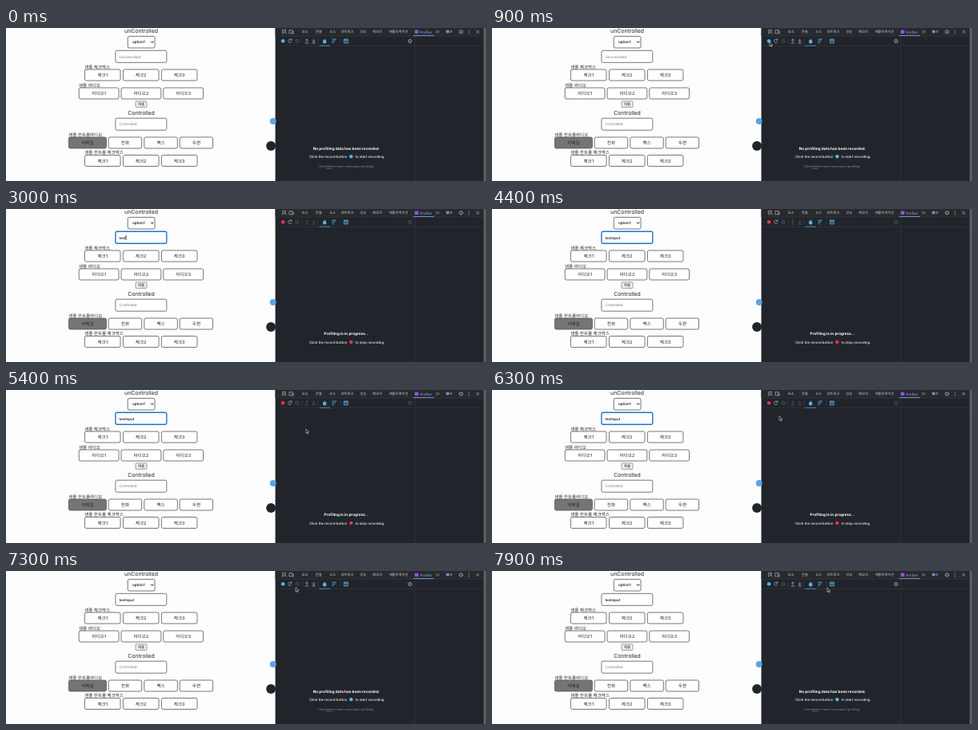
These frames come from a looping animation (600 px wide and 192 px high, 8000 ms). An HTML page:

```html
<!DOCTYPE html>
<html lang="ko">
<head>
<meta charset="utf-8">
<title>Profiler demo</title>
<style>
  html, body { margin: 0; width: 100%; height: 100%; overflow: hidden; background: #fdfdfd; }
  svg { display: block; width: 100vw; height: 100vh; }
  text {
    font-family: Inter, "Noto Sans CJK KR", "Noto Sans CJK", sans-serif;
    text-rendering: geometricPrecision;
    white-space: pre;
  }
  .icon { fill: none; stroke: #a9aeb6; stroke-width: .75; }
  .blue { fill: none; stroke: #5fb0ea; stroke-width: .9; }
</style>
</head>
<body>
<svg id="stage" viewBox="0 0 600 192" xmlns="http://www.w3.org/2000/svg"></svg>
<script>
const LOOP = 8000, START = 1000, FOCUS = 2000, STOP = 7200;
const WORD = "textinput";
const KEYS = [2300, 2500, 2600, 2800, 3200, 3300, 3500, 3600, 3700];
// Pointer routes as [time, x, y]; the pointer is hidden between them.
const ROUTES = [
  [[100, 165, 94], [800, 347, 18], [1000, 347, 17], [1500, 137, 21], [1600, 138, 24], [1900, 148, 33]],
  [[4700, 174, 36], [5100, 330, 62], [5400, 375, 49], [5900, 373, 48], [6600, 350, 23], [6900, 349, 22],
   [7100, 347, 17], [7200, 347, 17], [7600, 444, 40], [7900, 419, 21]]
];

const text = (x, y, s, size, o = {}) =>
  `<text x="${x}" y="${y}" font-size="${size}" fill="${o.fill || "#222"}" font-weight="${o.weight || 400}"` +
  ` text-anchor="${o.anchor || "start"}"${o.id ? ` id="${o.id}"` : ""}>${s}</text>`;
const mid = (x, y, s, size, o = {}) => text(x, y, s, size, { ...o, anchor: "middle" });
const box = (x, y, w, h, r, fill, extra = "") =>
  `<rect x="${x}" y="${y}" width="${w}" height="${h}" rx="${r}" fill="${fill}" ${extra}/>`;
const dot = (x, y, r, extra) => `<circle cx="${x}" cy="${y}" r="${r}" ${extra}/>`;
const path = (d, cls = "icon", extra = "") => `<path class="${cls}" d="${d}" ${extra}/>`;
const field = (x, y, w, h, fill = "#fff", extra = "") =>
  box(x, y, w, h, 2, fill, `stroke="#555" stroke-width=".8" ${extra}`);
const label = (x, y, s) => text(x, y, s, 5.5);
const button = (x, y, w, name, fill) => field(x, y, w, 14, fill) + mid(x + w / 2, y + 9, name, 5.6);
const row = (x, y, w, step, names) => names.map((name, i) => button(x + i * step, y, w, name)).join("");
const gear = (x, y, cls = "") =>
  `<g class="${cls}">${dot(x, y, 1.7, 'class="icon"')}${dot(x, y, 2.4, 'class="icon" stroke-dasharray="1 .885"')}</g>`;

function form() {
  const checks = ["체크1", "체크2", "체크3"];
  return mid(169, 6.4, "unControlled", 6.9) +
    field(152.2, 10.4, 33.8, 14.6) + text(158, 19.3, "option1", 4.6, { weight: 500, fill: "#000" }) +
    path("M181 16.6l1.7 1.8 1.7-1.8", "icon", 'style="stroke:#111;stroke-width:1"') +
    field(136.9, 28.3, 63.9, 15, "#fff", 'id="input"') +
    text(141.6, 37.7, "", 4.4, { id: "value" }) + box(160, 33, .8, 6, 0, "#111", 'id="caret"') +
    label(98.2, 50.6, "샘플 체크박스") + row(98.4, 52, 44.6, 48, checks) +
    label(91, 73.8, "샘플 라디오") + row(91.2, 75, 49.8, 52.8, ["라디오1", "라디오2", "라디오3"]) +
    box(162, 91.8, 14, 7.6, 1, "#efefef", 'stroke="#666" stroke-width=".6"') +
    mid(169, 97.3, "제출", 4.5, { weight: 500 }) +
    mid(169, 109, "Controlled", 6.9) +
    field(136.9, 113.2, 63.9, 15) + text(141.6, 122.4, "Controlled", 4.5, { fill: "#757575" }) +
    label(78.2, 135.8, "샘플 컨트롤라디오") +
    button(78.4, 137, 47, "이메일", "#757575") + button(128.2, 137, 41.5, "전화") +
    button(172.8, 137, 41.5, "팩스") + button(217.2, 137, 41.4, "우편") +
    label(98.2, 158.3, "샘플 컨트롤 체크박스") + row(98.4, 159.5, 44.6, 48, checks);
}

function tools() {
  const tabs = [[373.8, "요소"], [391, "콘솔"], [408.3, "소스"], [426.5, "네트워크"], [446.5, "성능"],
    [464.3, "메모리"], [490.5, "애플리케이션"]];
  const rule = x => path(`M${x} 12.5V19.5`, "icon", 'style="stroke:#3d424a;stroke-width:.6"');
  return box(336.6, 0, 263.4, 192, 0, "#21252b") + box(336.6, 0, 263.4, 10, 0, "#28292c") +
    path("M337 10.2H600M337 22.3H600M511 10V192", "icon", 'style="stroke:#343940;stroke-width:.7"') +
    path("M350 3.2V2.4H345.6V6.8H347M347.8 4.4L351 7.4M347.8 4.4V6.6M347.8 4.4H350") +
    path("M354 6.8V2.6H358.6M354 6.8H356.6M357.4 4H359.4V7H357.4Z") +
    tabs.map(([x, s]) => mid(x, 6.4, s, 4.3, { fill: "#d0d3d8" })).join("") +
    box(510.9, 2.4, 4.6, 4.6, .8, "#9a4fe0") + text(517.4, 6.5, "Profiler", 4.4, { fill: "#8ab4f8" }) +
    box(509, 9.2, 26, .8, 0, "#7cacf8") +
    path("M537.5 3l1.6 1.7-1.6 1.7M539.8 3l1.6 1.7-1.6 1.7") +
    box(550.2, 2.8, 3.8, 3.4, .5, "#5c95ee") + text(555, 6.3, "9", 4.3, { fill: "#d0d3d8" }) +
    gear(568.8, 4.8) +
    [2.8, 4.8, 6.8].map(y => dot(578.8, y, .6, 'fill="#a9aeb6"')).join("") +
    path("M587.8 3l3.6 3.6M591.4 3l-3.6 3.6") +
    box(597, 0, 3, 192, 0, "#5c5d61") +
    dot(346.2, 16.3, 2.3, 'class="record"') +
    path("M356.8 15A2.2 2.2 0 1 0 357 17M357.1 13.4V15.3H355.2") +
    path("M366.3 16.3A2.2 2.2 0 1 1 361.9 16.3A2.2 2.2 0 1 1 366.3 16.3M362.6 14.8L365.7 17.9", "icon", 'opacity=".35"') +
    rule(370.3) +
    '<g class="idle">' + path("M376 18V13.8M374.2 15.6L376 13.8 377.8 15.6M373.7 19H378.3") +
    path("M384.7 13.6V17.6M382.9 15.8L384.7 17.6 386.5 15.8M382.4 19H387") + "</g>" + rule(390) +
    path("M398.3 13C398.6 14.8 400.6 15.4 400.6 17.3A2.3 2.2 0 0 1 396 17.3C396 16 396.7 15.4 397 14.6L397.8 15.3Z",
      "blue", 'style="fill:#5fb0ea;stroke:none"') +
    box(391.5, 21.8, 13.5, .8, 0, "#4c9bd6") +
    path("M407.6 14.2H413M407.6 16.4H411.4M407.6 18.6H409.8", "blue") + rule(418) +
    path("M422.7 14H427.3V18.8H422.7ZM422.7 15.2H427.3M424.2 17H425.9", "blue") +
    gear(505, 16.4, "idle") +
    mid(425.6, 0, "", 4.72, { id: "headline", weight: 700, fill: "#fff" }) +
    '<g id="hint">' + text(379, 1.6, "Click the record button", 4.33, { weight: 500, fill: "#f0f1f3" }) +
    dot(431.4, 0, 2.2, 'class="record"') +
    text(436.8, 1.6, "", 4.33, { id: "action", weight: 500, fill: "#f0f1f3" }) + "</g>" +
    mid(425.3, 175.3, 'Click <tspan fill="#61b8f0" text-decoration="underline">here</tspan> to learn more about profiling.',
      3.75, { id: "more", fill: "#858b95" });
}

const stage = document.getElementById("stage");
stage.innerHTML = form() + tools() +
  dot(333.8, 117, 3.9, 'fill="#5aa5e6"') + dot(331.2, 148, 6, 'fill="#21252b"') +
  '<path id="arrow" d="M0 0V5.3L1.3 4.2 2.1 6 3 5.6 2.2 3.8H3.9Z" fill="#111" stroke="#fff" stroke-width=".5"/>' +
  '<path id="beam" d="M-.9 -3H.9M0 -3V3M-.9 3H.9" stroke="#222" stroke-width=".5"/>';

const $ = id => document.getElementById(id);
const set = (el, attrs) => { for (const k in attrs) el.setAttribute(k, attrs[k]); };
const show = (el, on) => set(el, { visibility: on ? "visible" : "hidden" });

function pointer(t) {
  const route = ROUTES.find(r => t >= r[0][0] && t <= r[r.length - 1][0]);
  if (!route) return null;
  const i = Math.max(1, route.findIndex(k => k[0] >= t));
  const [a, ax, ay] = route[i - 1], [b, bx, by] = route[i];
  const p = (t - a) / (b - a), e = p * p * (3 - 2 * p);
  return [ax + (bx - ax) * e, ay + (by - ay) * e];
}

function draw(t) {
  const recording = t >= START && t < STOP, focused = t >= FOCUS && t < STOP;
  const typed = KEYS.filter(k => k <= t).length;
  const last = typed ? KEYS[typed - 1] : FOCUS;

  const value = $("value");
  value.textContent = typed ? WORD.slice(0, typed) : "Uncontrolled";
  set(value, { fill: typed ? "#000" : "#757575", "font-weight": typed ? 500 : 400 });
  set($("input"), { stroke: focused ? "#2573cc" : "#555", "stroke-width": focused ? 1.4 : .8 });
  set($("caret"), { x: 141.6 + (typed ? value.getComputedTextLength() : 0) });
  show($("caret"), focused && (t - last) % 1000 < 500);

  stage.querySelectorAll(".record").forEach(el => set(el, { fill: recording ? "#e83444" : "#5fb0ea" }));
  stage.querySelectorAll(".idle").forEach(el => set(el, { opacity: recording ? .35 : 1 }));
  $("headline").textContent = recording ? "Profiling is in progress..." : "No profiling data has been recorded.";
  set($("headline"), { y: recording ? 157.7 : 153.2 });
  set($("hint"), { transform: `translate(0 ${recording ? 166.9 : 161.2})` });
  $("action").textContent = `to ${recording ? "stop" : "start"} recording.`;
  show($("more"), !recording);

  const at = pointer(t);
  const inField = at && at[0] > 137 && at[0] < 201 && at[1] > 28 && at[1] < 44;
  show($("arrow"), at && !inField);
  show($("beam"), inField);
  if (at) for (const id of ["arrow", "beam"]) set($(id), { transform: `translate(${at})` });
}

function tick() {
  draw(Math.floor(performance.now() % LOOP / 100) * 100);
  requestAnimationFrame(tick);
}
tick();
</script>
</body>
</html>
```
